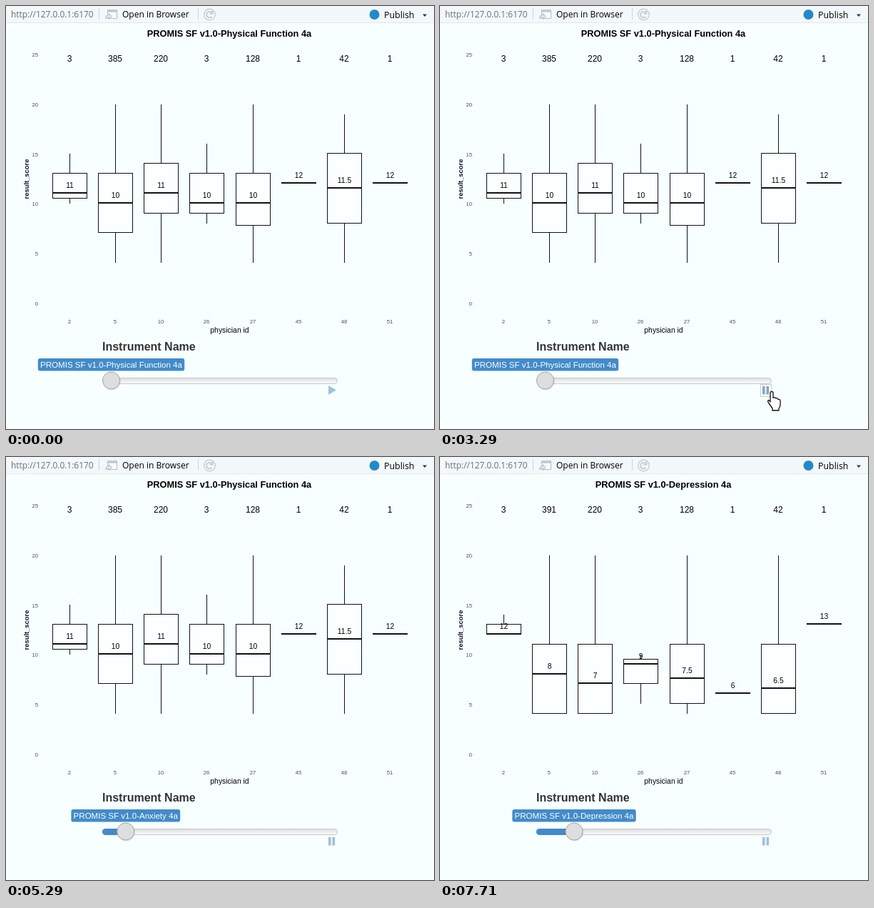
Recreate the animation shown at these times as an HTML page. Size 600 by 593 pixels, loop 8000 ms.

```html
<!DOCTYPE html>
<html lang="en">
<head>
<meta charset="utf-8">
<title>Box plots by physician</title>
<style>
html, body { margin: 0; width: 100%; height: 100%; overflow: hidden; background: #f8ffff; }
svg { display: block; width: 600px; height: 593px; font-family: "Liberation Sans", Arial, sans-serif; }
.bar { font-family: "Open Sans", "Noto Sans", sans-serif; font-size: 12px; }
.mid { text-anchor: middle; }
.tick { font-size: 7.7px; fill: #4d4d5c; }
.num { font-size: 12px; }
.med { font-size: 10.3px; }
.title { font-size: 12.8px; font-weight: bold; }
.line { stroke: #111; fill: #fbffff; shape-rendering: crispEdges; }
</style>
</head>
<body>
<svg viewBox="0 0 600 593">
  <defs>
    <linearGradient id="groove" x2="0" y2="1">
      <stop stop-color="#dedede"/><stop offset="1" stop-color="#fbfbfb"/>
    </linearGradient>
  </defs>
  <rect width="600" height="593" fill="#f8ffff"/>
  <g class="bar">
    <rect width="600" height="24" fill="#f3f8fb"/>
    <path d="M0 23.5H600" stroke="#e1e7eb"/>
    <path d="M130.5 3V19M269.5 3V19" stroke="#cdd4da"/>
    <text x="7" y="15.5" style="font-size:11.9px" fill="#6b7075">http://127.0.0.1:6170</text>
    <g fill="#f8fbfd" stroke="#b3bdc8">
      <path d="M142.5 5.5h13v12h-13z"/>
      <path d="M142.5 7.5h13" stroke-width="2"/>
      <path d="M139.5 17.5q0-5 5-5v-2l4 4-4 4v-2q-3-1-5 1z" fill="#dfe7ee"/>
    </g>
    <text x="163" y="15.5">Open in Browser</text>
    <g fill="none" stroke="#c5cbd0" stroke-width="1.3">
      <circle cx="285.5" cy="12" r="7.8"/>
      <path d="M288.500 15a4.300 4.300 0 1 1 0-6M289.500 6.500v4h-4" stroke-width="1.800"/>
    </g>
    <circle cx="516.5" cy="12" r="7" fill="#2389cb"/>
    <text x="530" y="16.5" style="font-size:12.4px">Publish</text>
    <path d="M584 11.500h6l-3 3.500z" fill="#333"/>
  </g>
  <text class="mid" x="313.5" y="458" font-size="10.4">physician id</text>
  <text class="mid" transform="translate(32 242.5) rotate(-90)" font-size="9.4" font-weight="bold" fill="#111133">result_score</text>
  <g id="ticks"></g>
  <g id="plot"></g>
  <text x="135" y="483" font-size="16" font-weight="bold" fill="#333">Instrument Name</text>
  <rect x="135.5" y="521.5" width="329" height="8" rx="4" fill="url(#groove)" stroke="#c6c9cb"/>
  <path id="fill" fill="#428bca"/>
  <rect id="tag" y="494" height="17.5" rx="3" fill="#428bca"/>
  <text id="label" class="mid" y="507" font-size="11.55" fill="#fff"></text>
  <g id="knob">
    <circle cx=".7" cy="526" r="12.5" opacity=".12"/>
    <circle cy="525" r="12" fill="#dedede" stroke="#a6a6a6"/>
  </g>
  <rect id="focus" x="449.5" y="530.5" width="15" height="17" fill="none" stroke="#999" stroke-dasharray="1 1"/>
  <path id="button"/>
  <path id="cursor" fill="#fff" stroke="#111" stroke-width="1.3" stroke-linejoin="round"/>
</svg>
<script>
// Time is counted in steps, seven per second.
const STEP = 1000 / 7, LOOP = 8000;
const ENTER = 19, HOVER = 21, CLICK = 22, LEAVE = 25, GONE = 33;
const PERIOD = 14, PLOT_LAG = 2;

// A box is [median, hinges, whiskers, outlier]; whiskers default to the full score range.
const sets = [
  { name: 'Physical Function', count: 385, boxes: [
    [11, 10.5, 13, 10, 15], [10, 7, 13], [11, 9, 14], [10, 9, 13, 8, 16],
    [10, 7.75, 13], [12], [11.5, 8, 15, 4, 19], [12]] },
  { name: 'Anxiety', count: 385, boxes: [
    [12, 11.5, 12, 11, 12], [8, 5, 11], [7, 4, 10, 4, 17, 20], [8, 6.5, 9.5, 5, 11],
    [7.5, 5, 11], [4], [7, 4, 10.5, 4, 18], [16]] },
  { name: 'Depression', count: 391, boxes: [
    [12, 12, 13, 12, 14], [8, 4, 11], [7, 4, 11], [9, 7, 9.5, 5, 10],
    [7.5, 5, 11], [6], [6.5, 4, 11], [13]] }
];
const ids = [2, 5, 10, 26, 27, 45, 48, 51];
const HAND = 'M-3 2q0-2 2-2t2 2v7q1-1.5 3-.5l.5 1q2-1 3 .5l.5 1q2.5-.5 3 1.5v6q0 3-2 5v3h-9v-3l-5-7q-2-3-1-4t3 2z';
const ARROW = 'M0 0v16l4-4 3 6 2-1-3-6h5z';
const PLAY = 'M452 532l11 6.5-11 6.5z';
const PAUSE = 'M452 533h3.6v11.5h-3.6zM457.5 533h3.6v11.5h-3.6z';

const el = id => document.getElementById(id);
const set = (id, attrs) => Object.entries(attrs).forEach(([k, v]) => el(id).setAttribute(k, v));
const text = (cls, x, y, s) => `<text class="${cls}" x="${x}" y="${y}">${s}</text>`;
const fullName = s => `PROMIS SF v1.0-${s.name} 4a`;
const clamp = v => Math.min(1, Math.max(0, v));
const column = i => Math.floor(89 + 64.25 * i) + .5;
const row = score => Math.floor(415.2 - 13.9 * score) + .5;

function box([med, q1, q3, low = 4, high = 20, dot], i) {
  const x = column(i), left = x - 24, mid = row(med) - .5;
  const body = q1 === undefined ? '' :
    `<path class="line" d="M${x} ${row(high)}V${row(q3)}M${x} ${row(q1)}V${row(low)}M${left} ${row(q3)}h48V${row(q1)}h-48z"/>`;
  const outlier = dot ? `<circle cx="${x}" cy="${row(dot) - 1}" r="2.2"/>` : '';
  return body + outlier +
    `<path class="line" stroke-width="2" d="M${left - .5} ${mid}h49"/>` +
    text('mid med', x, mid - 7.3, med);
}

function drawPlot(s) {
  const counts = [3, s.count, 220, 3, 128, 1, 42, 1];
  el('plot').innerHTML = text('mid title', 313, 43, fullName(s)) +
    counts.map((n, i) => text('mid num', column(i) - .5, 78, n)).join('') +
    s.boxes.map(box).join('');
}

function drawSlider(i) {
  const x = 147.5 + 20.25 * i;
  el('label').textContent = fullName(sets[i]);
  const width = el('label').getComputedTextLength() + 6.5;
  set('label', { x });
  set('tag', { x: x - width / 2, width });
  set('knob', { transform: `translate(${x})` });
  set('fill', { d: i ? `M${x} 521H139.5a4.5 4.5 0 0 0 0 9H${x}z` : '' });
}

function drawPointer(k) {
  const hover = k >= HOVER && k < LEAVE, playing = k >= CLICK;
  const come = 1 - clamp((k - ENTER) / (HOVER - ENTER));
  const go = clamp((k - LEAVE + 1) / (GONE - LEAVE)) * (k >= LEAVE);
  set('cursor', {
    d: hover ? HAND : ARROW,
    transform: `translate(${466 + 16 * come + 24 * go} ${540.5 + 18 * come + 56 * go})`,
    visibility: k >= ENTER && k < GONE ? 'visible' : 'hidden'
  });
  set('button', { d: playing ? PAUSE : PLAY, fill: hover ? '#8ba6bd' : '#9bc2e0' });
  set('focus', { visibility: playing && hover ? 'visible' : 'hidden' });
}

el('ticks').innerHTML =
  [0, 5, 10, 15, 20, 25].map(v => text('mid tick', v < 10 ? 42.8 : 40.7, 419.8 - 13.94 * v, v)).join('') +
  ids.map((id, i) => text('mid tick', column(i) - .5, 445, id)).join('');

const start = performance.now();
let last = -1;
function tick() {
  const k = Math.floor(((performance.now() - start) % LOOP + 5) / STEP);
  if (k !== last) {
    const index = at => Math.max(0, Math.floor((at - CLICK) / PERIOD));
    drawPlot(sets[index(k - PLOT_LAG)]);
    drawSlider(index(k));
    drawPointer(k);
    last = k;
  }
  requestAnimationFrame(tick);
}
tick();
</script>
</body>
</html>
```
